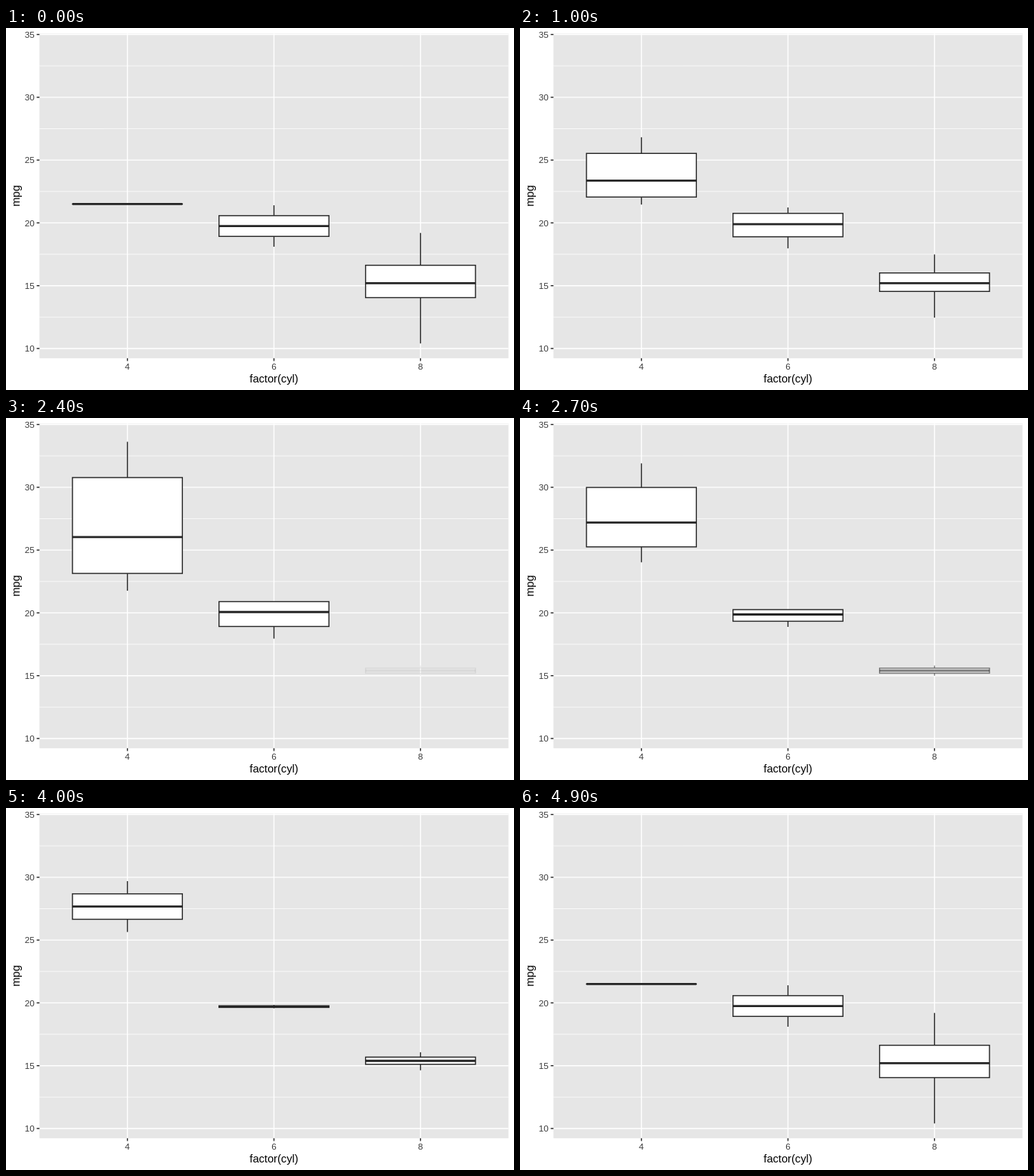
These frames come from a looping animation (672 by 480 pixels, 5 s). An HTML page with a canvas:

```html
<!DOCTYPE html>
<html lang="en">
<head>
<meta charset="utf-8">
<title>mpg by cylinder count</title>
<style>
  html, body { margin: 0; width: 100%; height: 100%; overflow: hidden; background: #fff; }
  canvas { display: block; }
</style>
</head>
<body>
<canvas id="plot" width="672" height="480"></canvas>
<script>
const ctx = document.getElementById('plot').getContext('2d');

const PANEL = { left: 44.29, top: 7.33, right: 664.67, bottom: 437.86 };
const Y_MIN = 9.225, Y_MAX = 35.075;
const SLOT = (PANEL.right - PANEL.left) / 3.2;
const LINE = 1.42, TICK = 3.67;
const INK = '#262626', LABEL = '#3c3c3c', GREY = '#e6e6e6';
const FONT = '"Liberation Sans", Arial, Helvetica, sans-serif';

const xAt = i => PANEL.left + (0.6 + i) * SLOT;
const yAt = v => PANEL.bottom - (v - Y_MIN) / (Y_MAX - Y_MIN) * (PANEL.bottom - PANEL.top);

// Per state, one [min, q1, median, q3, max] for each cylinder group.
const STATES = [
  [[21.5, 21.5, 21.5, 21.5, 21.5], [18.1, 18.925, 19.75, 20.575, 21.4], [10.4, 14.05, 15.2, 16.625, 19.2]],
  [[21.4, 22.8, 25.85, 30.9, 33.9], [17.8, 18.85, 20.1, 21, 21], null],
  [[26, 27.1, 28.2, 29.3, 30.4], [19.7, 19.7, 19.7, 19.7, 19.7], [15, 15.2, 15.4, 15.6, 15.8]]
];
const HOLD = 6, MOVE = 11, CYCLE = HOLD + MOVE;
const FRAMES = 50, FRAME_MS = 100;

const mix = (a, b, p) => a.map((v, i) => v + (b[i] - v) * p);
const sineInOut = p => (1 - Math.cos(Math.PI * p)) / 2;

function line(x1, y1, x2, y2, color, width) {
  ctx.strokeStyle = color;
  ctx.lineWidth = width;
  ctx.beginPath();
  ctx.moveTo(x1, y1);
  ctx.lineTo(x2, y2);
  ctx.stroke();
}

function text(str, x, y, size, color, align) {
  ctx.font = `${size}px ${FONT}`;
  ctx.fillStyle = color;
  ctx.textAlign = align;
  ctx.fillText(str, x, y);
}

function drawAxes() {
  const { left, top, right, bottom } = PANEL;
  ctx.fillStyle = '#fff';
  ctx.fillRect(0, 0, 672, 480);
  ctx.fillStyle = GREY;
  ctx.fillRect(left, top, right - left, bottom - top);

  for (let v = 12.5; v < 35; v += 5) line(left, yAt(v), right, yAt(v), '#fff', LINE / 2);
  for (let v = 10; v <= 35; v += 5) {
    const y = yAt(v);
    line(left, y, right, y, '#fff', LINE);
    line(left - TICK, y, left, y, INK, LINE);
    text(v, left - 6.6, y + 4.2, 11.73, LABEL, 'right');
  }
  [4, 6, 8].forEach((cyl, i) => {
    const x = xAt(i);
    line(x, top, x, bottom, '#fff', LINE);
    line(x, bottom, x, bottom + TICK, INK, LINE);
    text(cyl, x, 452.9, 11.73, LABEL, 'center');
  });

  text('factor(cyl)', (left + right) / 2, 469.6, 14.67, '#000', 'center');
  ctx.save();
  ctx.translate(17.9, (top + bottom) / 2);
  ctx.rotate(-Math.PI / 2);
  text('mpg', 0, 0, 14.67, '#000', 'center');
  ctx.restore();
}

function drawBox(i, stats, alpha) {
  const [min, q1, median, q3, max] = stats.map(yAt);
  const x = xAt(i), half = 0.375 * SLOT;
  const box = [x - half, q3, 2 * half, Math.max(q1 - q3, 0.01)];
  ctx.globalAlpha = alpha;
  line(x, q3, x, max, INK, LINE);
  line(x, q1, x, min, INK, LINE);
  ctx.fillStyle = '#fff';
  ctx.fillRect(...box);
  ctx.strokeRect(...box);
  line(x - half, median, x + half, median, INK, 2 * LINE);
  ctx.globalAlpha = 1;
}

function drawGroup(i, from, to, p) {
  if (from && to) drawBox(i, mix(from, to, p), 1);
  else if (from && p < 1) drawBox(i, mix(from, Array(5).fill(from[2]), p), 1); // shrink out
  else if (to && p > 0) drawBox(i, to, p); // fade in
}

function render(ms) {
  const shown = Math.floor(ms / FRAME_MS) % FRAMES;
  // 51 computed steps are spread over 50 shown ones.
  const step = Math.round(shown * FRAMES / (FRAMES - 1));
  const state = Math.floor(step / CYCLE);
  const p = sineInOut(Math.max(0, step % CYCLE - HOLD + 1) / MOVE);
  const from = STATES[state], to = STATES[(state + 1) % STATES.length];
  drawAxes();
  from.forEach((stats, i) => drawGroup(i, stats, to[i], p));
}

let start;
function tick(now) {
  start ??= now;
  render(now - start);
  requestAnimationFrame(tick);
}
render(0);
requestAnimationFrame(tick);
</script>
</body>
</html>
```
